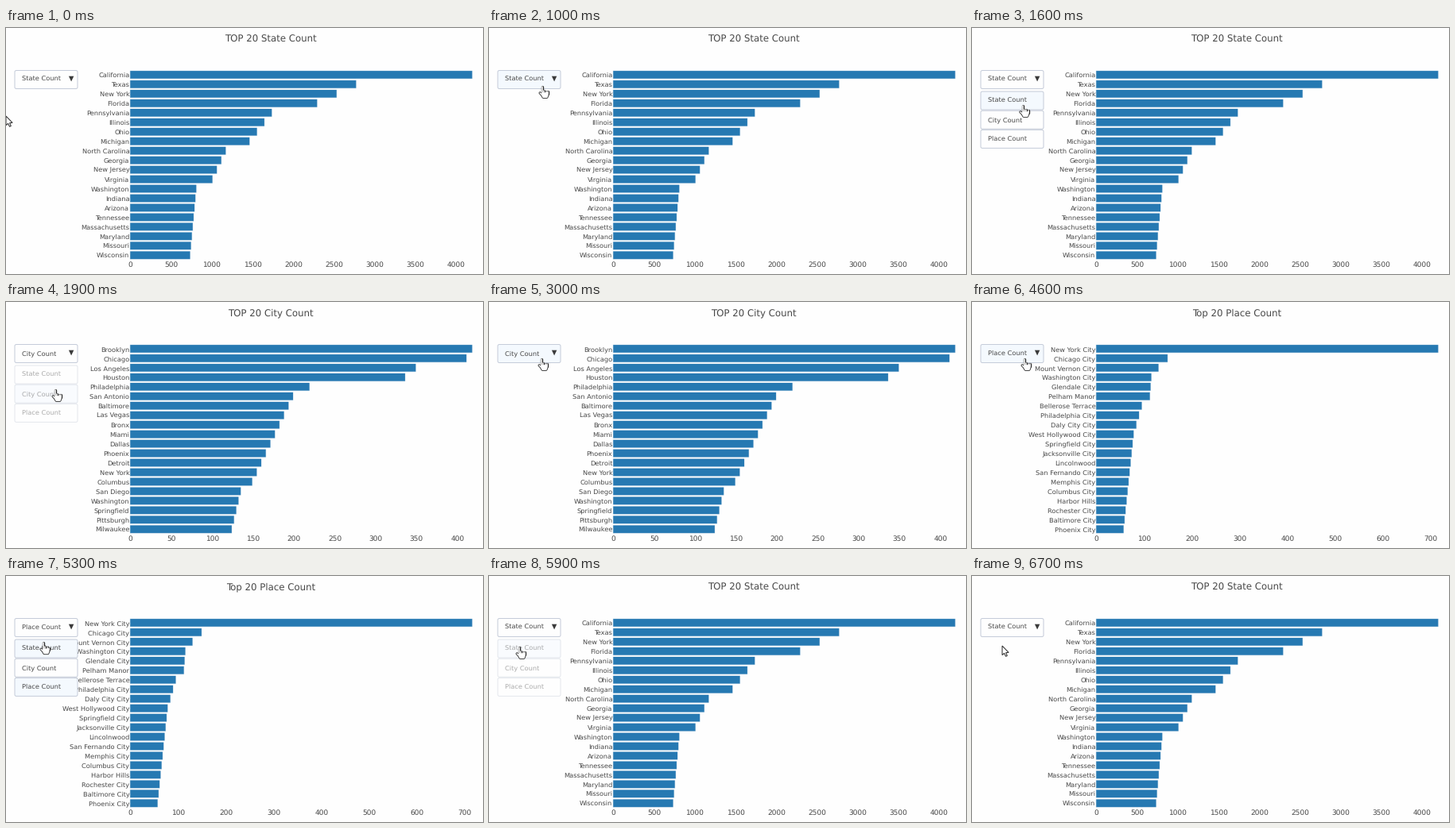
These frames come from a looping animation (600 px wide and 310 px high, 6.8 s). A matplotlib script:

```python
import matplotlib.pyplot as plt
import numpy as np
from matplotlib.animation import FuncAnimation
from matplotlib.patches import FancyBboxPatch, Polygon, Rectangle

W, H, DPI = 600, 310, 100
STEP, FRAMES = 100, 68
PX = 72 / DPI  # points per pixel

INK, BLUE, LINE, HOVER, PAPER, DARK = (
    "#484848", "#2679b2", "#c5ccd9", "#f4f9fe", "#fefefe", "#2a2a2a")
X0, X_MAX = 156.3, 586.3
ROWS, ROW0, ROW_STEP, BAR_H = 20, 58.9, 11.97, 9.6

OPTIONS = ["State Count", "City Count", "Place Count"]

# title prefix, tick step, names, key counts by rank (linear in between)
CHARTS = [
    ("TOP", 500,
     "California,Texas,New York,Florida,Pennsylvania,Illinois,Ohio,Michigan,"
     "North Carolina,Georgia,New Jersey,Virginia,Washington,Indiana,Arizona,"
     "Tennessee,Massachusetts,Maryland,Missouri,Wisconsin",
     {0: 4193, 1: 2769, 3: 2291, 4: 1735, 7: 1462, 8: 1170, 11: 1007, 12: 809, 19: 733}),
    ("TOP", 50,
     "Brooklyn,Chicago,Los Angeles,Houston,Philadelphia,San Antonio,Baltimore,"
     "Las Vegas,Bronx,Miami,Dallas,Phoenix,Detroit,New York,Columbus,San Diego,"
     "Washington,Springfield,Pittsburgh,Milwaukee",
     {0: 418, 1: 411, 2: 349, 3: 336, 4: 219, 5: 199, 14: 149, 15: 135, 19: 124}),
    ("Top", 100,
     "New York City,Chicago City,Mount Vernon City,Washington City,Glendale City,"
     "Pelham Manor,Bellerose Terrace,Philadelphia City,Daly City City,"
     "West Hollywood City,Springfield City,Jacksonville City,Lincolnwood,"
     "San Fernando City,Memphis City,Columbus City,Harbor Hills,Rochester City,"
     "Baltimore City,Phoenix City",
     {0: 715, 1: 149, 2: 130, 3: 115, 5: 112, 6: 95, 9: 78, 19: 57}),
]

# menu (opens, closes) in ms; closing switches to the next chart
MENUS = [(1200, 1900), (3100, 4100), (4800, 5900)]

# pointer moves: start, end, where to
START = (0, 111)
MOVES = [(0, 900, (67, 72)), (1300, 1800, (62, 109)), (2100, 2700, (66, 70)),
         (3100, 3800, (59, 139)), (4100, 4500, (66, 70)), (4800, 5600, (38, 88))]

plt.rcParams.update({"font.family": "DejaVu Sans", "text.hinting": "none"})
fig = plt.figure(figsize=(W / DPI, H / DPI), dpi=DPI, facecolor=PAPER)
ax = fig.add_axes([0, 0, 1, 1])
ax.set(xlim=(0, W), ylim=(H, 0))
ax.axis("off")


def write(x, y, text, px=8.25, ha="left", z=2):
    return ax.text(x, y, text, size=px * PX, color=INK, ha=ha, va="baseline", zorder=z)


def box(y, z):
    return ax.add_patch(FancyBboxPatch(
        (11, y), 79, 23, boxstyle="round,pad=0,rounding_size=2",
        fc=PAPER, ec=LINE, lw=PX, zorder=z))


def build_chart(option, prefix, tick, names, keys):
    counts = np.interp(range(ROWS), list(keys), list(keys.values()))
    scale = (X_MAX - X0) / counts[0]
    parts = [write(333.2, 18, f"{prefix} 20 {option}", 11.8, "center")]
    for i, (name, count) in enumerate(zip(names.split(","), counts)):
        y = ROW0 + i * ROW_STEP
        bar = Rectangle((X0, y - BAR_H / 2), count * scale, BAR_H,
                        fc=BLUE, ec=(.15, .47, .7, .25), lw=PX, snap=False)
        parts += [ax.add_patch(bar), write(155.3, y + 3, name, ha="right")]
    for n in range(0, int(counts[0]) + 1, tick):
        parts.append(write(X0 + n * scale, 301, str(n), 9, "center"))
    return parts


class Pointer:
    """A set of shapes given around the pointer's tip."""

    def __init__(self):
        self.parts = []

    def polygon(self, points, **style):
        patch = ax.add_patch(Polygon(points, **style))
        self.parts.append((patch.set_xy, np.array(points), patch))

    def stroke(self, points, **style):
        line, = ax.plot([], [], solid_capstyle="round", **style)
        self.parts.append((lambda p: line.set_data(*p.T), np.array(points), line))

    def place(self, tip, visible):
        for move, points, artist in self.parts:
            move(points + tip)
            artist.set_visible(visible)


def build_arrow():
    arrow = Pointer()
    arrow.polygon([(0, 0), (0, 11.6), (2.6, 9.3), (4.5, 13.3), (6.3, 12.5),
                   (4.6, 8.6), (8.1, 8.4)], fc="white", ec=DARK, lw=PX, zorder=8)
    return arrow


def build_hand():
    # dark strokes below, thinner white ones on top
    hand = Pointer()
    fingers = [[(2.35 * k, top), (2.35 * k, 11)] for k, top in enumerate((1.6, 7, 7.5, 8.4))]
    thumb = [(-2.8, 9.9), (1, 13.6)]
    palm = [(.2, 10), (6.9, 10), (6.9, 12.4), (5.8, 15.2), (1.2, 15.2), (0, 13)]
    for color, width, z in ((DARK, 3.3, 8), ("white", 1.6, 9)):
        for limb in fingers + [thumb]:
            hand.stroke(limb, color=color, lw=width * PX, zorder=z)
        hand.polygon(palm, fc=color, ec=color, lw=width * PX, zorder=z, joinstyle="round")
    return hand


charts = [build_chart(option, *chart) for option, chart in zip(OPTIONS, CHARTS)]

BUTTON_Y = 53.5
button = box(BUTTON_Y, 3)
button_text = write(20, 67, "", z=4)
ax.add_patch(Polygon([(78.9, 60.7), (85.3, 60.7), (82.1, 67.4)], fc="#3a3a3a", lw=0, zorder=4))

ITEM_Y = [80 + 24.2 * i for i in range(len(OPTIONS))]
items = [(box(y, 5), write(20, round(y + 14), name, z=6)) for y, name in zip(ITEM_Y, OPTIONS)]
arrow, hand = build_arrow(), build_hand()


def pointer_at(t):
    tip = np.array(START, float)
    for start, end, goal in MOVES:
        u = np.clip((t - start) / (end - start), 0, 1)
        tip += (np.array(goal) - tip) * u * u * (3 - 2 * u)
    return tip


def menu_alpha(t):
    for start, end in MENUS:
        if start <= t <= end:
            return .45 if t in (start, end) else 1
    return 0


def inside(tip, y):
    return 11 <= tip[0] <= 90 and y <= tip[1] <= y + 23.8


def draw(frame):
    t = frame * STEP
    active = sum(t >= end for _, end in MENUS) % len(CHARTS)
    for i, parts in enumerate(charts):
        for part in parts:
            part.set_visible(i == active)

    tip, alpha = pointer_at(t), menu_alpha(t)
    pointing = over_button = inside(tip, BUTTON_Y)
    button.set_facecolor(HOVER if over_button else PAPER)
    button_text.set_text(OPTIONS[active])

    for i, (frame_box, label) in enumerate(items):
        over = alpha > 0 and inside(tip, ITEM_Y[i])
        pointing = pointing or over
        frame_box.set_facecolor(HOVER if over or i == active else PAPER)
        for part in (frame_box, label):
            part.set_visible(alpha > 0)
            part.set_alpha(alpha)

    arrow.place(tip, not pointing)
    hand.place(tip, pointing)
    return []


anim = FuncAnimation(fig, draw, frames=FRAMES, interval=STEP, repeat=True,
                     repeat_delay=0, blit=False)
plt.show()
```
